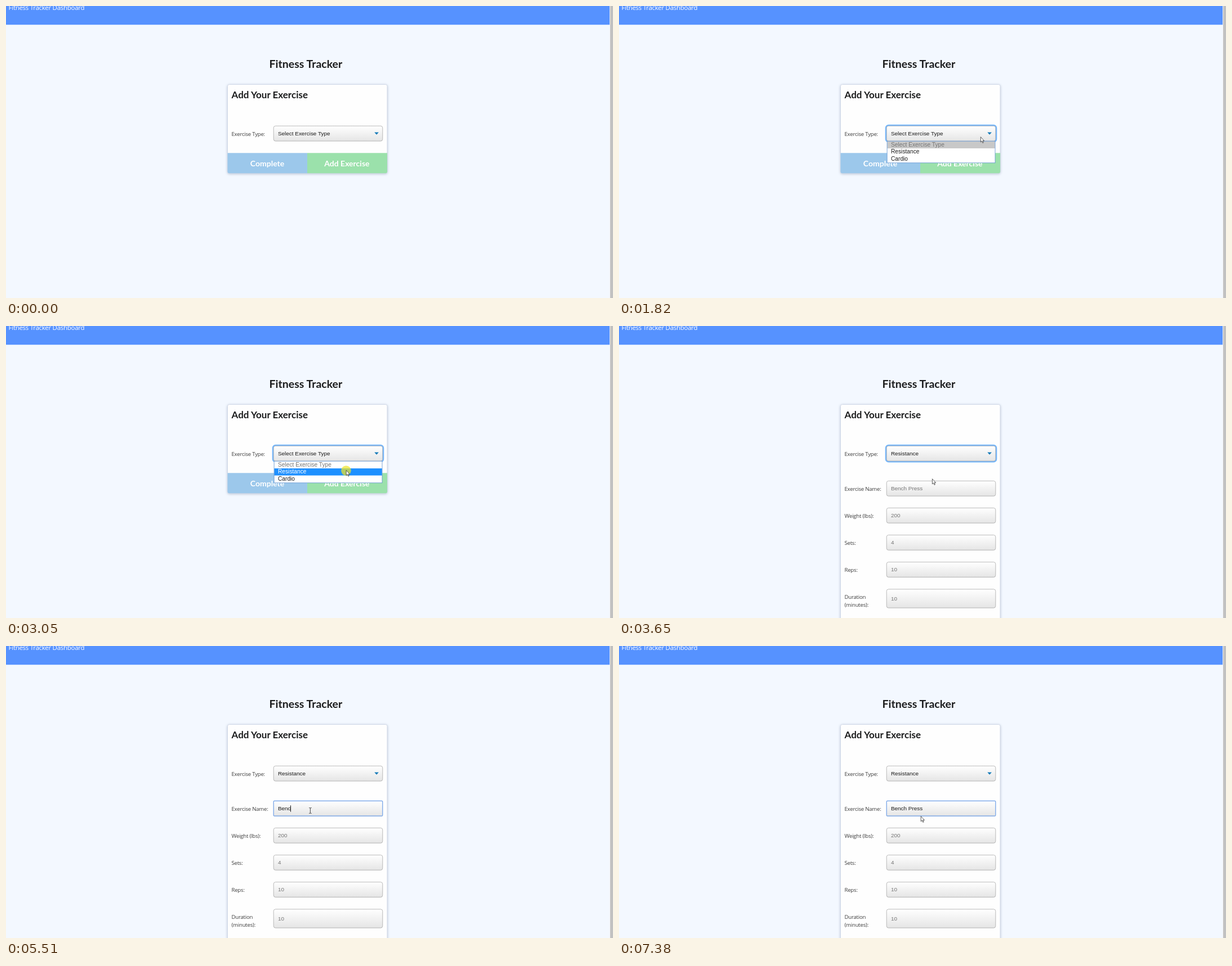
An HTML page for the animation above (7.99 s loop, 1078 by 519 pixels).

```html
<!DOCTYPE html>
<html lang="en">
<head>
<meta charset="utf-8">
<title>Fitness Tracker</title>
<style>
html, body { margin: 0; width: 100%; height: 100%; overflow: hidden; background: #f3f8ff; }
svg { display: block; width: 100%; height: 100%; }
text { white-space: pre; }
.ui { font-family: "Open Sans", "Noto Sans", sans-serif; }
.nav { font-size: 11.5px; letter-spacing: -.28px; fill: #fff; }
.label { font-size: 9.6px; letter-spacing: -.22px; fill: #3d3d3d; }
.head { font-family: Lato, sans-serif; font-weight: 700; fill: #1b1c1d; }
.btn { font-family: Lato, sans-serif; font-weight: 700; font-size: 14px; fill: #fff; text-anchor: middle; }
.field { font-family: "Liberation Sans", Arial, sans-serif; font-size: 9.95px; fill: #1c1c1c; }
.hint { fill: #757575; }
.option { font-family: "Liberation Sans", Arial, sans-serif; font-size: 10.2px; }
.card { filter: drop-shadow(0 1px 2px rgba(50, 70, 105, .3)); }
</style>
</head>
<body>
<svg viewBox="0 0 1078 519" preserveAspectRatio="none">
  <defs>
    <linearGradient id="face" x2="0" y2="1">
      <stop stop-color="#fff"/><stop offset="1" stop-color="#e5e5e5"/>
    </linearGradient>
  </defs>
  <rect width="1078" height="519" fill="#f3f8ff"/>
  <rect width="1072" height="33.3" fill="#5692ff"/>
  <rect x="1072" width="6" height="519" fill="#f1f1f1"/>
  <rect x="1073" width="5" height="519" fill="#c1c1c1"/>
  <text class="ui nav" x="4.6" y="7">Fitness Tracker Dashboard</text>
  <text class="head" x="467.6" y="110" font-size="19.5">Fitness Tracker</text>
  <rect id="card" class="card" x="393.5" y="139.5" width="283.5" rx="3" fill="#fefefe" stroke="#ccd5e6" stroke-width=".8"/>
  <text class="head" x="400.6" y="163.7" font-size="17">Add Your Exercise</text>
  <g id="buttons">
    <path d="M393.5 261.3H535V297.3H396.5a3 3 0 0 1-3-3Z" fill="#9cc8eb"/>
    <path d="M535 261.3H677V294.3a3 3 0 0 1-3 3H535Z" fill="#9be1ab"/>
    <text class="btn" x="464" y="284.8">Complete</text>
    <text class="btn" x="605.4" y="284.8">Add Exercise</text>
  </g>
  <g id="form"></g>
  <g id="menu"></g>
  <circle id="click" cx="604" cy="257" r="8.8" fill="#eee428" opacity=".72"/>
  <path id="arrow" d="M0 0V9.2L2.1 7.3 3.6 10.7 5 10.1 3.6 6.9H6.3Z" fill="#fff" stroke="#333" stroke-width=".8" stroke-linejoin="round"/>
  <path id="beam" d="M538.2 287.6h1.6l.6.5.6-.5h1.6M540.4 288V297M538.2 297.4h1.6l.6-.5.6.5h1.6" fill="none" stroke="#333" stroke-width=".9"/>
</svg>
<script>
const LOOP = 7990;
const byId = id => document.getElementById(id);
const show = (el, on) => el.setAttribute('visibility', on ? 'inherit' : 'hidden');

function add(parent, tag, attrs, text = '') {
  const el = document.createElementNS('http://www.w3.org/2000/svg', tag);
  for (const key in attrs) el.setAttribute(key, attrs[key]);
  el.textContent = text;
  return parent.appendChild(el);
}

function label(parent, y, text) {
  return add(parent, 'text', { class: 'ui label', x: 400.5, y }, text);
}

function field(parent, y, height, text, hint) {
  const box = { x: 475.2, y, width: 193.6, height, rx: 3.5 };
  add(parent, 'rect', { ...box, y: y + .8, fill: '#000', opacity: .06 });
  const ring = add(parent, 'rect', { ...box, fill: 'none', stroke: '#3b99fc', 'stroke-opacity': .7, 'stroke-width': 5, visibility: 'hidden' });
  const face = add(parent, 'rect', { ...box, fill: 'url(#face)', stroke: '#aaa', 'stroke-width': .8 });
  const value = add(parent, 'text', { class: hint ? 'field hint' : 'field', x: 482.9, y: y + height / 2 + 3.4 }, text);
  return { ring, face, value };
}

const svg = document.querySelector('svg');
const form = byId('form');
const menu = byId('menu');

// Exercise type row, always visible
const typeRow = add(svg, 'g', {});
svg.insertBefore(typeRow, form);
label(typeRow, 230.6, 'Exercise Type:');
const type = field(typeRow, 213.2, 26.8, 'Select Exercise Type');
add(typeRow, 'path', { d: 'M654.3 224.6h7.6l-3.8 4.2Z', fill: '#0f7ab8' });

// Resistance form
const name = field(form, 275.4, 26.8, 'Bench Press', true);
const caret = add(form, 'rect', { y: 283.4, width: 1, height: 11.2, fill: '#111' });
['200', '4', '10'].forEach((hint, i) => field(form, 323.4 + 48.1 * i, 26.8, hint, true));
field(form, 467.8, 33.2, '10', true);
['Exercise Name:', 'Weight (lbs):', 'Sets:', 'Reps:'].forEach((text, i) => label(form, 292.8 + 48.1 * i, text));
label(form, 485, 'Duration');
label(form, 498.6, '(minutes):');

// Open list
add(menu, 'rect', { x: 476.1, y: 240.2, width: 191.9, height: 38.6, fill: '#fff' });
const options = ['Select Exercise Type', 'Resistance', 'Cardio'].map((text, i) => {
  const y = 240.4 + 12.7 * i;
  const bar = add(menu, 'rect', { x: 476.3, y, width: 191.5, height: 12.7 });
  const item = add(menu, 'text', { class: 'option', x: 483, y: y + 9.2 }, text);
  return { bar, item };
});
add(menu, 'rect', { x: 476.1, y: 240.2, width: 191.9, height: 38.6, fill: 'none', stroke: '#5b8fd0', 'stroke-width': .8 });

// Pointer stops: [time, x, y]
const stops = [
  [550, 790.5, 364.5], [1160, 650.5, 242.4], [1820, 642.3, 232.7], [2410, 616.5, 247],
  [3050, 604.2, 256.4], [3650, 556.4, 271.7], [7380, 536.2, 302.6]
];
// Typing: [time, characters, caret shown]
const typing = [[0, 0, false], [5510, 4, true], [6140, 7, true], [6750, 11, true], [7380, 11, false]];
const at = (list, t) => list.filter(step => step[0] <= t).pop();

function render(t) {
  const open = t >= 1820 && t < 3650;
  const chosen = t >= 3650;
  const typed = t >= 5510;
  const hover = t >= 3050;

  byId('card').setAttribute('height', chosen ? 420 : 157.8);
  show(byId('buttons'), !chosen);
  show(form, chosen);
  show(menu, open);
  show(type.ring, t >= 1820 && !typed);
  type.value.textContent = chosen ? 'Resistance' : 'Select Exercise Type';

  options.forEach(({ bar, item }, i) => {
    const active = hover && i === 1;
    bar.setAttribute('fill', active ? '#1e90ff' : !hover && i === 0 ? '#c8c8c8' : '#fff');
    item.setAttribute('fill', active ? '#fff' : i === 0 ? '#757575' : '#1c1c1c');
  });

  const [, count, blink] = at(typing, t);
  name.value.textContent = 'Bench Press'.slice(0, count || 11);
  name.value.setAttribute('class', typed ? 'field' : 'field hint');
  name.face.setAttribute('stroke', typed ? '#6d9ee6' : '#aaa');
  name.face.setAttribute('stroke-width', typed ? 1.2 : .8);
  name.face.setAttribute('rx', typed ? 1.5 : 3.5);
  show(caret, chosen && blink);
  caret.setAttribute('x', Math.floor(482.6 + name.value.getComputedTextLength()));

  const beam = t >= 4280 && t < 7380;
  const stop = at(stops, t);
  show(byId('beam'), beam);
  show(byId('arrow'), stop && !beam);
  show(byId('click'), hover && !chosen);
  if (stop) byId('arrow').setAttribute('transform', `translate(${stop[1]} ${stop[2]})`);
}

const start = performance.now();
function tick() {
  render((performance.now() - start) % LOOP);
  requestAnimationFrame(tick);
}
tick();
</script>
</body>
</html>
```
